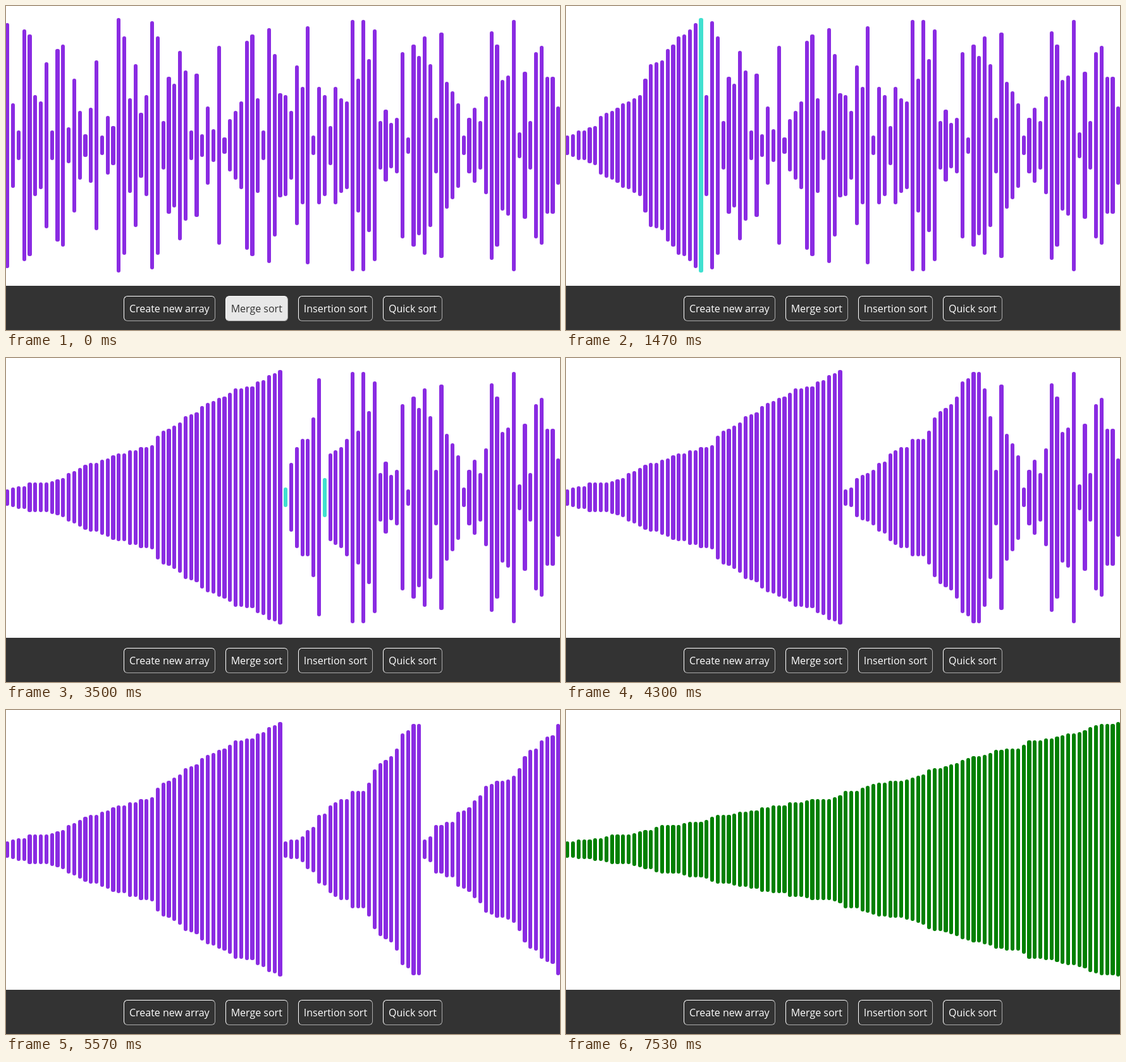
Animation of 876 by 513 pixels, one loop 7.76 s. Source, as an HTML page with a canvas:

```html
<!DOCTYPE html>
<html lang="en">
<head>
<meta charset="utf-8">
<title>Sorting visualizer</title>
<style>
  html, body { margin: 0; width: 100%; height: 100%; overflow: hidden; background: #fff; }
  canvas { display: block; width: 876px; height: 443px; }
  nav {
    display: flex; justify-content: center; align-items: flex-start; gap: 16px;
    box-sizing: border-box; width: 876px; height: 70px; padding-top: 16px;
    background: #333;
  }
  button {
    margin: 0; padding: 8px; border: 1px outset #fff; border-radius: 6px;
    background: transparent; color: #fff; white-space: nowrap;
    font: 16px/22px "Open Sans", sans-serif;
  }
</style>
</head>
<body>
<canvas width="876" height="443"></canvas>
<nav>
  <button>Create new array</button>
  <button id="merge">Merge sort</button>
  <button>Insertion sort</button>
  <button>Quick sort</button>
</nav>
<script>
const LOOP = 7760;
const BAR = { x: -0.7, pitch: 8.797, width: 6.15, mid: 220.71, unit: 2.584 };
const PLAIN = '#8a2be2', ACTIVE = '#40e0d0', DONE = '#008000';

const values = [
  75, 26, 9, 71, 68, 31, 27, 51, 9, 59, 62, 11, 41, 21, 7, 23, 52, 6, 18, 12,
  78, 67, 29, 50, 20, 31, 76, 67, 15, 42, 38, 58, 46, 9, 44, 7, 24, 10, 61, 5,
  16, 21, 27, 64, 68, 29, 9, 72, 56, 32, 31, 21, 49, 36, 73, 6, 36, 31, 12, 36,
  29, 27, 77, 41, 77, 53, 71, 15, 22, 14, 17, 57, 5, 62, 55, 67, 50, 17, 69, 39,
  33, 26, 6, 17, 23, 15, 30, 70, 62, 40, 43, 77, 8, 45, 15, 57, 61, 42, 42, 24
];

// Every step compares bars a and b, then writes value v into slot k.
const steps = [];
function mergeSort(arr, lo, hi) {
  if (lo >= hi) return;
  const mid = (lo + hi) >> 1;
  mergeSort(arr, lo, mid);
  mergeSort(arr, mid + 1, hi);
  const old = arr.slice();
  let i = lo, j = mid + 1;
  for (let k = lo; k <= hi; k++) {
    const a = i <= mid ? i : j, b = j <= hi ? j : i;
    const left = j > hi || (i <= mid && old[i] <= old[j]);
    arr[k] = old[left ? i++ : j++];
    steps.push({ a, b, k, v: arr[k] });
  }
}
mergeSort(values.slice(), 0, values.length - 1);

// [ms, steps done]; counts past the last step are bars turned green.
const pace = [
  [199, 0], [200, 1.2], [800, 61], [970, 67], [1470, 117.17], [1730, 145.17],
  [3500, 322.17], [4130, 386.17], [4300, 403.83], [5570, 527.83],
  [6530, 626.83], [6977, 672], [7330, 740.3], [7525, 772]
];
function progress(t) {
  if (t <= pace[0][0]) return 0;
  for (let n = 1; n < pace.length; n++) {
    const [t0, p0] = pace[n - 1], [t1, p1] = pace[n];
    if (t <= t1) return p0 + (p1 - p0) * (t - t0) / (t1 - t0);
  }
  return pace[pace.length - 1][1];
}

// The picture advances 30 times a second, with one stall.
function tick(t) {
  const n = Math.floor((Math.floor(t / 10) * 10 + 5) * 3 / 100);
  const snapped = Math.round(n * 10 / 3) * 10;
  return snapped > 800 && snapped < 970 ? 800 : snapped;
}

const ctx = document.querySelector('canvas').getContext('2d');
function drawBar(i, value, color) {
  const x = BAR.x + i * BAR.pitch, half = value * BAR.unit;
  const left = Math.round(x), right = Math.round(x + BAR.width);
  const top = Math.round(BAR.mid - half), bottom = Math.round(BAR.mid + half);
  ctx.fillStyle = color;
  ctx.beginPath();
  ctx.roundRect(left, top, right - left, bottom - top, 3);
  ctx.fill();
}

function drawBars(t) {
  const p = progress(t);
  const whole = Math.min(Math.floor(p), steps.length);
  const phase = Math.floor((p % 1) * 3);
  const arr = values.slice();
  for (let n = 0; n < whole; n++) arr[steps[n].k] = steps[n].v;
  const now = steps[whole];
  if (now && phase === 2) arr[now.k] = now.v;
  const green = Math.floor(p) - steps.length;
  const active = now && p > 0 && phase === 0 ? [now.a, now.b] : [];

  ctx.clearRect(0, 0, 876, 443);
  arr.forEach((v, i) =>
    drawBar(i, v, i < green ? DONE : active.includes(i) ? ACTIVE : PLAIN));
}

const button = document.getElementById('merge');
const mix = (a, b, f) => Math.round(a + (b - a) * f);
function drawButton(t) {
  const f = Math.min(1, Math.max(0, (t - 170) / 200));
  const bg = mix(232, 51, f), ink = mix(51, 255, f);
  button.style.background = `rgb(${bg},${bg},${bg})`;
  button.style.color = `rgb(${ink},${ink},${ink})`;
}

const start = performance.now();
function frame() {
  const t = tick((performance.now() - start) % LOOP);
  drawBars(t);
  drawButton(t);
  requestAnimationFrame(frame);
}
frame();
</script>
</body>
</html>
```
